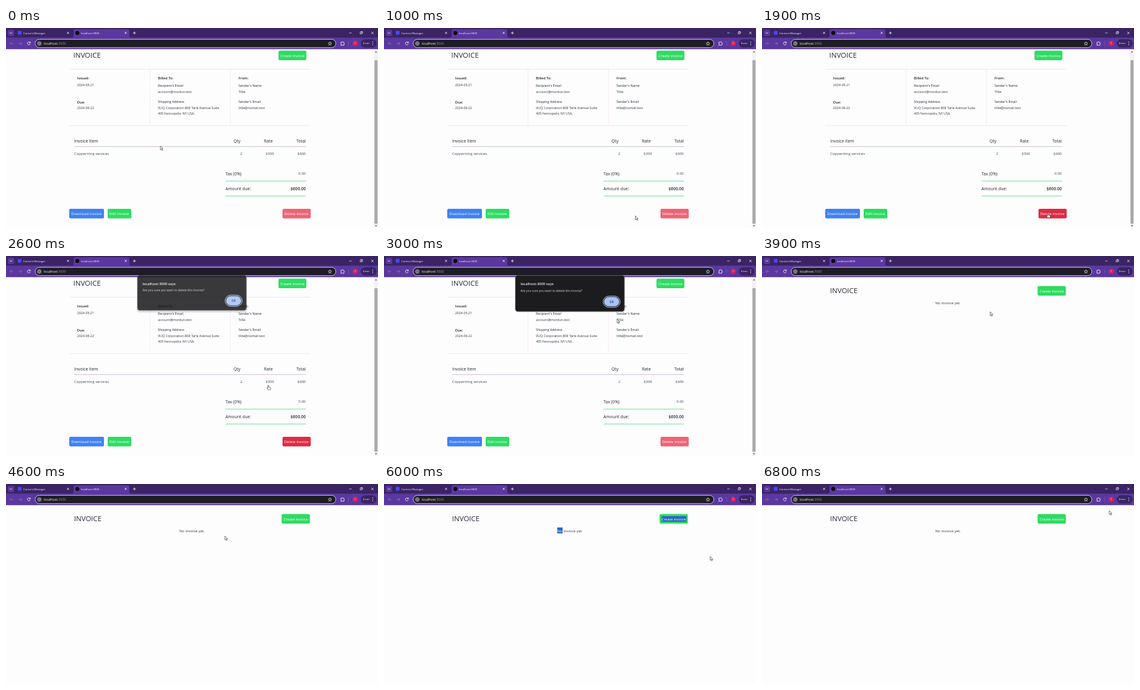
These frames come from a looping animation (600x323 px, 6.9 s). An HTML page:

```html
<!DOCTYPE html>
<html lang="en">
<head>
<meta charset="utf-8">
<title>Invoice</title>
<style>
  html, body { margin: 0; width: 100%; height: 100%; overflow: hidden; background: #fefdfe; }
  svg { display: block; width: 600px; height: 323px; }
  text { font-family: "Open Sans", "Noto Sans", sans-serif; fill: #30343c; font-size: 5.25px; white-space: pre; }
  .h1 { font-size: 11.5px; font-weight: 500; fill: #262a33; }
  .label { font-size: 5.75px; font-weight: 600; fill: #22262e; }
  .sub { font-weight: 500; fill: #22262e; }
  .head { font-size: 6.8px; font-weight: 500; fill: #22262e; }
  .cell { font-size: 5.9px; fill: #444850; }
  .btn { font-size: 5.95px; fill: #fff; }
  .tab { font-size: 4.35px; font-weight: 500; fill: #fff; }
  .end { text-anchor: end; }
  .mid { text-anchor: middle; }
  .icon { fill: none; stroke: #fff; stroke-width: .8; }
  .dim { stroke: #8f78bd; }
  .rule { stroke: #e9e1e8; stroke-width: .8; }
  .green { stroke: #6fe092; stroke-width: 1; }
</style>
</head>
<body>
<svg viewBox="0 0 600 323">
  <rect width="600" height="323" fill="#fefdfe"/>

  <g id="invoice">
    <text class="h1" x="108.5" y="48.2">INVOICE</text>
    <rect x="439.5" y="36.5" width="45" height="15.5" rx="2.5" fill="#2fdc62"/>
    <text class="btn" x="442.6" y="46.6">Create invoice</text>

    <path class="rule" d="M102 66.5H491M102 157.7H491"/>
    <path d="M232.3 67V157M361.8 67V157" stroke="#eddde5" stroke-width=".8" stroke-dasharray="2 1"/>

    <text class="label" x="114.7" y="83.2">Issued:</text>
    <text x="114.7" y="94">2024-05-21</text>
    <text class="label" x="114.7" y="122">Due:</text>
    <text x="114.7" y="131">2024-06-22</text>

    <text class="label" x="245" y="83.2">Billed To:</text>
    <text class="sub" x="245" y="95">Recipient's Email</text>
    <text x="245" y="104.8">account@mordun.test</text>
    <text class="sub" x="245" y="121">Shipping Address</text>
    <text x="245" y="130.8">VUQ Corporation 808 Tarle Avenue Suite</text>
    <text x="245" y="139.8">405 Fennopolis, NY USA.</text>

    <text class="label" x="375" y="83.2">From:</text>
    <text class="sub" x="375" y="95">Sender's Name</text>
    <text x="375" y="104.8">Tillie</text>
    <text class="sub" x="375" y="121">Sender's Email</text>
    <text x="375" y="130.8">tillie@nomail.test</text>

    <text class="head" x="110" y="185.4">Invoice Item</text>
    <text class="head" x="367" y="185.4">Qty</text>
    <text class="head" x="416" y="185.4">Rate</text>
    <text class="head end" x="483.5" y="185.4">Total</text>
    <path d="M110 191.6H484" stroke="#cfc3d2" stroke-width="1"/>
    <text class="cell" x="110" y="205.3">Copywriting services</text>
    <text class="cell" x="377.7" y="205.3">2</text>
    <text class="cell" x="418.8" y="205.3">$300</text>
    <text class="cell end" x="483.5" y="205.3">$600</text>

    <text class="head" x="354" y="237.5">Tax (0%)</text>
    <text class="cell end" x="483.5" y="237">0.00</text>
    <path class="green" d="M354 247.2H484M354 271.3H484"/>
    <text class="head" x="354" y="261.8">Amount due:</text>
    <text class="head end" x="483.5" y="261.8" style="font-weight:600;font-size:6.6px">$600.00</text>

    <rect x="102" y="292" width="56" height="15.6" rx="2" fill="#3f82f3"/>
    <text class="btn" x="105.2" y="302.2">Download invoice</text>
    <rect x="164" y="292" width="38" height="15.6" rx="2" fill="#2fdc62"/>
    <text class="btn" x="167" y="302.2">Edit invoice</text>
    <rect id="delete" x="446" y="292" width="45.5" height="15.6" rx="2"/>
    <text class="btn" x="449" y="302.2">Delete invoice</text>

    <rect x="593.5" y="34" width="6.5" height="289" fill="#f3f1f3"/>
    <rect x="594.3" y="52" width="4.9" height="264" fill="#a9a8ab"/>
    <path d="M595 39.5l1.8-2.4 1.8 2.4zM595 318.5l1.8 2.4 1.8-2.4z" fill="#6b6870"/>
  </g>

  <g id="empty">
    <text class="h1" x="109.8" y="60">INVOICE</text>
    <rect x="444.5" y="48.5" width="45.5" height="15.5" rx="2.5" fill="#2fdc62"/>
    <rect class="selection" x="447.6" y="52" width="40" height="9" fill="#2765c5"/>
    <text class="btn" x="447.8" y="58.8">Create invoice</text>
    <rect class="selection" x="279.4" y="70.2" width="8.6" height="9.6" fill="#2c64c9"/>
    <text x="279.6" y="77.5" style="font-size:6px"><tspan id="no">No</tspan> invoice yet.</text>
  </g>

  <g id="chrome">
    <rect width="600" height="17" fill="#3a2464"/>
    <rect y="15.5" width="600" height="18.7" fill="#5b389f"/>
    <path d="M106 16q3 0 3-3V5q0-3 3-3h84q3 0 3 3v8q0 3 3 3z" fill="#5b389f"/>
    <rect x="2.8" y="3" width="10.4" height="10" rx="3" fill="#5b389f"/>
    <path class="icon" d="M6.2 7.2l1.8 1.7 1.8-1.7"/>
    <rect x="19" y="4.8" width="6" height="6" rx="1" fill="#4b46f0"/>
    <text class="tab" x="28" y="9.7">Content Manager</text>
    <circle cx="115" cy="8" r="3.2" fill="#0b0a0d"/>
    <text class="tab" x="121" y="9.7">localhost:3000</text>
    <path class="icon" d="M98.5 6.3l3.2 3.2m0-3.2l-3.2 3.2M191.5 6.3l3.2 3.2m0-3.2l-3.2 3.2M204.8 8h4.6m-2.3-2.3v4.6"/>
    <path class="icon" d="M553.5 8h4M571.2 6.7h2.8v2.8h-2.8zM572.3 6.7V5.7h2.8v2.8h-1M589 6l4 4m0-4l-4 4" style="stroke-width:.65"/>

    <path class="icon dim" d="M11.5 25H6.5m2.2-2.3L6.5 25l2.2 2.3M20.3 25h5m-2.2-2.3l2.2 2.3-2.2 2.3"/>
    <path class="icon" d="M38.9 23.5a2.4 2.4 0 1 0 .3 2.2M39.2 22v2h-2"/>
    <rect x="47" y="18.3" width="485" height="13.4" rx="6.7" fill="#1e1c24" stroke="#cdbdee" stroke-width="1"/>
    <circle cx="53.7" cy="25" r="4.6" fill="#49395f"/>
    <circle class="icon" cx="53.7" cy="25" r="2.3" style="stroke-width:.6"/>
    <path class="icon" d="M53.7 24.7v1.5m0-2.6v.5" style="stroke-width:.6"/>
    <text x="61" y="26.9" style="fill:#fff">localhost<tspan fill="#9b98a2">:3000</tspan></text>
    <path class="icon" d="M522.5 22.2l.8 1.9 2 .2-1.5 1.4.4 2-1.7-1-1.7 1 .4-2-1.5-1.4 2-.2z" style="stroke-width:.65"/>
    <path class="icon" d="M540 23h1.7a.8.8 0 0 1 1.6 0h1.6v1.6a.8.8 0 0 1 0 1.7v1.5H540v-1.5a.8.8 0 0 0 0-1.7z"/>
    <path d="M552.5 21.5v7" stroke="#7e62b6" stroke-width=".6"/>
    <circle cx="563.2" cy="24.8" r="4.3" fill="#d7245c"/>
    <text class="tab mid" x="563.2" y="26.3" style="font-size:4px">T</text>
    <rect x="572.2" y="18.2" width="25.6" height="13.2" rx="6.6" fill="#3a2464"/>
    <text class="tab" x="576" y="26.4">Error</text>
    <path d="M591.5 22.4h0m0 2.4h0m0 2.4h0" stroke="#fff" stroke-width="1.2" stroke-linecap="round"/>
  </g>

  <g id="dialog">
    <rect x="211" y="31.4" width="178" height="59.6" rx="4.5" fill="#000" opacity=".16"/>
    <rect id="panel" x="212" y="31.4" width="175.6" rx="4" fill="#1c1c1f" stroke="#4a4a50" stroke-width=".5"/>
    <text x="220.2" y="46.7" style="font-size:5.75px;font-weight:600;fill:#f0f0f2">localhost:3000 says</text>
    <g id="body">
      <text x="220.2" y="58.2" style="font-size:4.82px;fill:#d5d5d9">Are you sure you want to delete this invoice?</text>
      <rect id="ring" x="353.5" y="64.8" width="27.4" height="18" rx="9" fill="#1c1c1f" stroke="#b4c8f0" stroke-width="1"/>
      <rect x="355" y="66.3" width="24.4" height="15" rx="7.5" fill="#a9c3f2"/>
      <text class="mid" x="367.2" y="75.6" style="font-size:4.7px;font-weight:600;fill:#173a72">OK</text>
    </g>
  </g>

  <g id="cursor">
    <path id="arrow" d="M0 0V6.2L1.5 4.9 2.5 7.2 3.5 6.8 2.5 4.5H4.4Z" fill="#fff" stroke="#222" stroke-width=".6" stroke-linejoin="round"/>
    <circle id="busy" cx="4.2" cy="-.8" r="1.7" fill="none" stroke="#2478d4" stroke-width="1"/>
    <path id="hand" d="M-.7.5q.7-1 1.4 0V3l2.6.7q.8.3.7 1.2L3.4 7.6H-.3L-2.3 4.7q.3-.9 1.6.2Z" fill="#fff" stroke="#222" stroke-width=".6" stroke-linejoin="round"/>
  </g>
</svg>
<script>
  const LOOP = 6900, STEP = 100;
  const $ = id => document.getElementById(id);
  const show = (el, on) => el.setAttribute("display", on ? "inline" : "none");
  const within = (t, from, to) => t >= from && t < to;

  // Pointer stops: time, x, y
  const stops = [
    [0, 249, 190.5], [100, 249, 190.5], [700, 372, 303], [1400, 450, 304],
    [1800, 461, 299], [2300, 461, 299], [2600, 423, 208.5], [3000, 376, 102],
    [3300, 367, 76], [3600, 367, 81], [3900, 368, 90], [4200, 372, 143],
    [4600, 353, 84], [4900, 300, 78], [5000, 289, 74], [5500, 522, 60],
    [5700, 524, 76], [6000, 526, 117], [6200, 536, 100], [6300, 547, 70],
    [6600, 560, 43], [LOOP, 560, 43]
  ];

  function pointerAt(t) {
    const next = stops.findIndex(s => s[0] > t);
    const [t0, x0, y0] = stops[next - 1], [t1, x1, y1] = stops[next];
    const k = (t - t0) / (t1 - t0);
    return [x0 + (x1 - x0) * k, y0 + (y1 - y0) * k];
  }

  function render(t) {
    const cleared = t >= 3900;
    const opening = t < 2700;
    const selected = within(t, 5300, 6200);
    const hover = within(t, 1400, 2900);
    const hand = within(t, 1400, 2700);

    show($("invoice"), !cleared);
    show($("empty"), cleared);
    $("delete").setAttribute("fill", hover ? "#de2b42" : "#ee6475");

    show($("dialog"), within(t, 2600, 3700));
    $("dialog").setAttribute("opacity", opening ? 0.87 : 1);
    $("panel").setAttribute("height", opening ? 56.4 : 58);
    $("body").setAttribute("transform", `translate(0 ${opening ? -1.6 : 0})`);
    show($("ring"), t < 3300);

    document.querySelectorAll(".selection").forEach(el => show(el, selected));
    $("no").style.fill = selected ? "#fff" : "";

    show($("hand"), hand);
    show($("arrow"), !hand);
    show($("busy"), within(t, 3600, 3900));
    $("cursor").setAttribute("transform", `translate(${pointerAt(t)})`);
  }

  const start = performance.now();
  function tick() {
    const t = (performance.now() - start) % LOOP;
    render(Math.floor(t / STEP) * STEP);
    requestAnimationFrame(tick);
  }
  tick();
</script>
</body>
</html>
```
